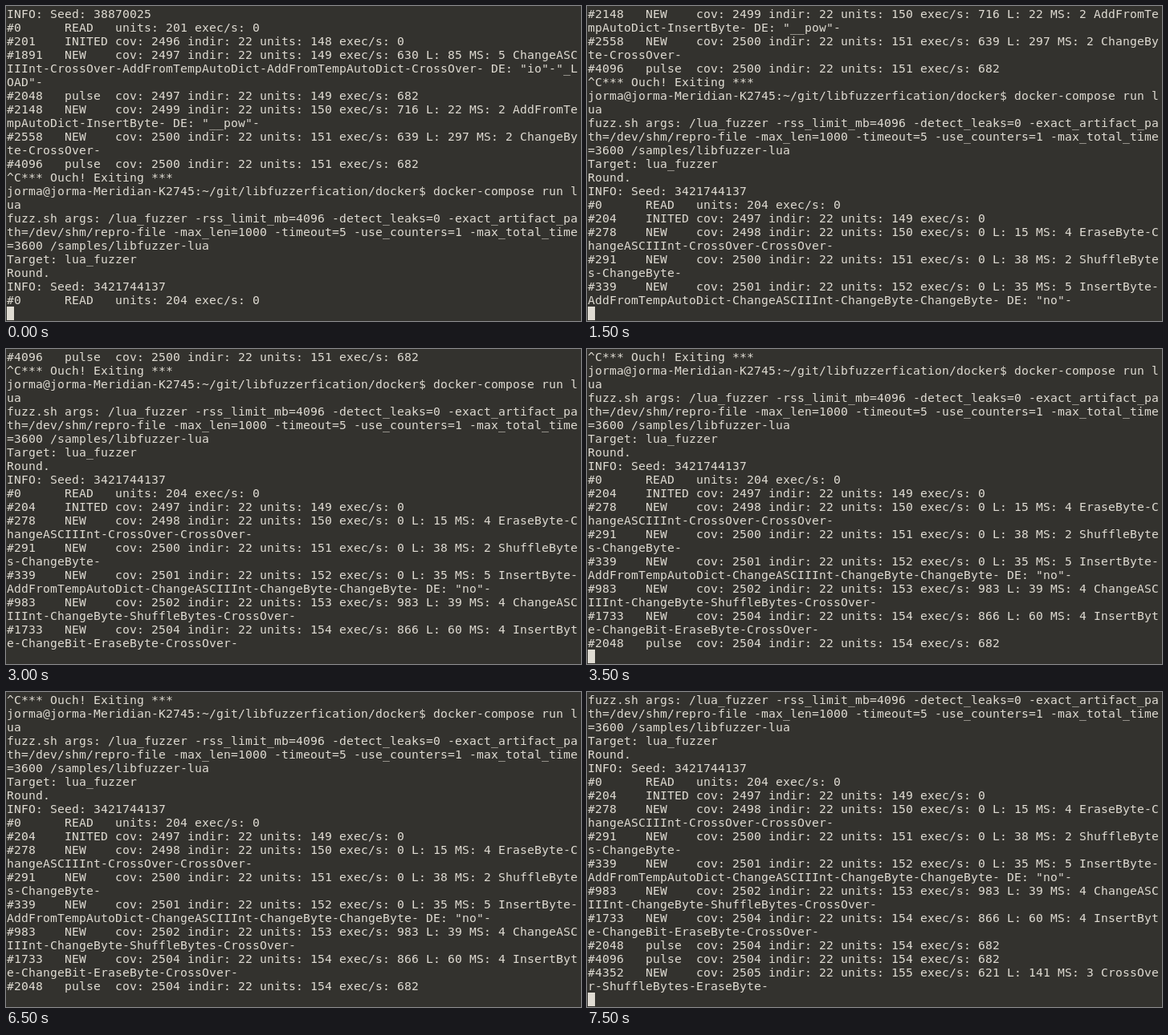
These frames come from a looping animation (716 px wide and 393 px high, 8 s). An HTML page:

```html
<!DOCTYPE html>
<html lang="en">
<head>
<meta charset="utf-8">
<title>Fuzzer terminal</title>
<style>
  html, body { margin: 0; width: 100%; height: 100%; overflow: hidden; background: #33322e; }
  #screen {
    position: absolute; left: 1px; top: 1px; margin: 0;
    font: 14.667px/17px "DejaVu Sans Mono", monospace;
    letter-spacing: calc(9px - 1ch);
    font-variant-ligatures: none;
    white-space: pre; color: #dfdbd2;
  }
  #cursor {
    position: absolute; left: 1px; top: 375px;
    width: 9px; height: 17px; background: #dfdbd2;
  }
</style>
</head>
<body>
<pre id="screen"></pre>
<div id="cursor"></div>
<script>
const LOOP = 8000, COLS = 79, ROWS = 22;

const log = [
  'INFO: Seed: 38870025',
  '#0      READ   units: 201 exec/s: 0',
  '#201    INITED cov: 2496 indir: 22 units: 148 exec/s: 0',
  '#1891   NEW    cov: 2497 indir: 22 units: 149 exec/s: 630 L: 85 MS: 5 ChangeASCIIInt-CrossOver-AddFromTempAutoDict-AddFromTempAutoDict-CrossOver- DE: "io"-"_LOAD"-',
  '#2048   pulse  cov: 2497 indir: 22 units: 149 exec/s: 682',
  '#2148   NEW    cov: 2499 indir: 22 units: 150 exec/s: 716 L: 22 MS: 2 AddFromTempAutoDict-InsertByte- DE: "__pow"-',
  '#2558   NEW    cov: 2500 indir: 22 units: 151 exec/s: 639 L: 297 MS: 2 ChangeByte-CrossOver-',
  '#4096   pulse  cov: 2500 indir: 22 units: 151 exec/s: 682',
  '^C*** Ouch! Exiting ***',
  'jorma@jorma-Meridian-K2745:~/git/libfuzzerfication/docker$ docker-compose run lua',
  'fuzz.sh args: /lua_fuzzer -rss_limit_mb=4096 -detect_leaks=0 -exact_artifact_path=/dev/shm/repro-file -max_len=1000 -timeout=5 -use_counters=1 -max_total_time=3600 /samples/libfuzzer-lua',
  'Target: lua_fuzzer',
  'Round.',
  'INFO: Seed: 3421744137',
  '#0      READ   units: 204 exec/s: 0',
  '#204    INITED cov: 2497 indir: 22 units: 149 exec/s: 0',
  '#278    NEW    cov: 2498 indir: 22 units: 150 exec/s: 0 L: 15 MS: 4 EraseByte-ChangeASCIIInt-CrossOver-CrossOver-',
  '#291    NEW    cov: 2500 indir: 22 units: 151 exec/s: 0 L: 38 MS: 2 ShuffleBytes-ChangeByte-',
  '#339    NEW    cov: 2501 indir: 22 units: 152 exec/s: 0 L: 35 MS: 5 InsertByte-AddFromTempAutoDict-ChangeASCIIInt-ChangeByte-ChangeByte- DE: "no"-',
  '#983    NEW    cov: 2502 indir: 22 units: 153 exec/s: 983 L: 39 MS: 4 ChangeASCIIInt-ChangeByte-ShuffleBytes-CrossOver-',
  '#1733   NEW    cov: 2504 indir: 22 units: 154 exec/s: 866 L: 60 MS: 4 InsertByte-ChangeBit-EraseByte-CrossOver-',
  '#2048   pulse  cov: 2504 indir: 22 units: 154 exec/s: 682',
  '#4096   pulse  cov: 2504 indir: 22 units: 154 exec/s: 682',
  '#4352   NEW    cov: 2505 indir: 22 units: 155 exec/s: 621 L: 141 MS: 3 CrossOver-ShuffleBytes-EraseByte-'
];

// [time in ms, log entries printed, cursor visible]
const steps = [
  [0, 15, 1], [500, 19, 0], [1500, 19, 1], [2000, 20, 0], [2500, 20, 1],
  [3000, 21, 0], [3500, 22, 1], [4500, 22, 0], [5000, 22, 1], [5500, 22, 0],
  [6000, 22, 1], [6500, 22, 0], [7000, 23, 0], [7500, 24, 1]
];

const screen = document.getElementById('screen');
const cursor = document.getElementById('cursor');
const wrap = line => line.match(new RegExp(`.{1,${COLS}}`, 'g'));
const view = count => log.slice(0, count).flatMap(wrap).slice(-ROWS).join('\n');

let shown = null;
function draw(now) {
  const t = now % LOOP;
  const step = steps.filter(s => s[0] <= t).pop();
  if (step !== shown) {
    shown = step;
    screen.textContent = view(step[1]);
    cursor.style.visibility = step[2] ? 'visible' : 'hidden';
  }
  requestAnimationFrame(tick);
}
const start = performance.now();
const tick = now => draw(Math.max(0, now - start));
tick(start);
</script>
</body>
</html>
```
